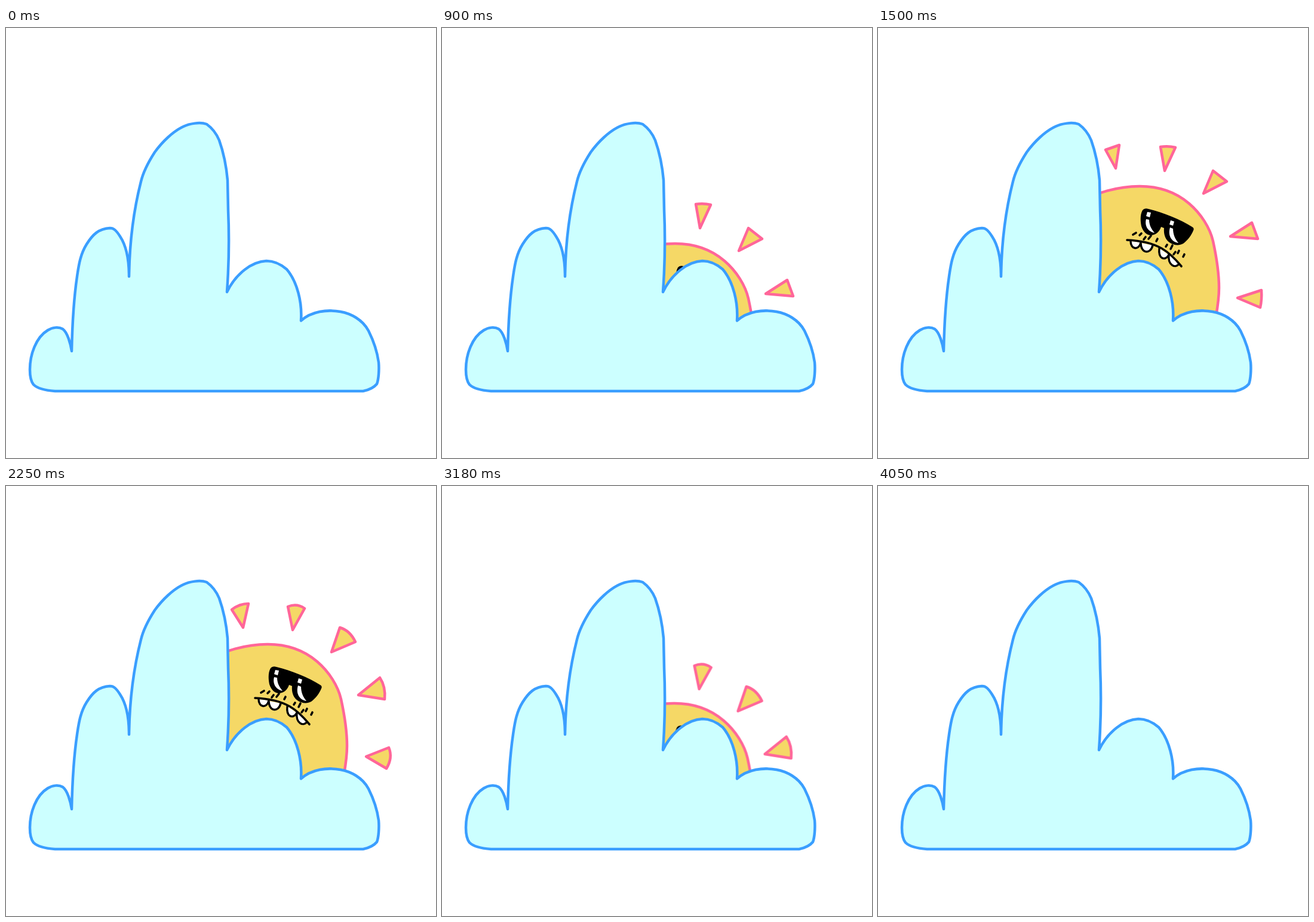
These frames come from a looping animation (720 px wide and 720 px high, 4.5 s). An HTML page:

```html
<!DOCTYPE html>
<html lang="en">
<head>
<meta charset="utf-8">
<title>Sun behind a cloud</title>
<style>
  html, body { margin: 0; width: 100%; height: 100%; overflow: hidden; background: #fff; }
  svg { display: block; width: 100%; height: 100%; }
  path { stroke-linecap: round; stroke-linejoin: round; }

  .sun { animation: peek 4.5s infinite; }
  .pose { animation: flip .3s step-end infinite; }
  .pose.alt { animation-delay: -.15s; }

  .warm { fill: #f5d866; stroke: #ff6699; stroke-width: 4.5; }
  .cloud { fill: #ccffff; stroke: #3a9eff; stroke-width: 4.5; }
  .ink { fill: none; stroke: #000; stroke-width: 3.6; }
  .tooth { fill: #fff; stroke: #000; stroke-width: 3.4; }
  .shine { fill: #fff; }

  /* The sun moves on a 30 ms clock: 50 steps up, 51 steps down. */
  @keyframes peek {
    0% { transform: translate(-120px, 240px); animation-timing-function: steps(50); }
    33.3333% { transform: translate(0, 0); }
    56.6667% { transform: translate(0, 0); animation-timing-function: steps(51); }
    90.6667%, 100% { transform: translate(-120px, 240px); }
  }
  @keyframes flip {
    0% { opacity: 1; }
    50%, 100% { opacity: 0; }
  }
</style>
</head>
<body>
<svg viewBox="0 0 720 720">
  <clipPath id="horizon"><path d="M0 0H720V600H0Z"/></clipPath>

  <g clip-path="url(#horizon)">
    <g class="sun">
      <path class="warm" d="M330 296C362 275 405 265 438 265C470 265 499 275 521 294
        C541 311 556 335 561 357C566 380 571 410 571 435C571 450 569 465 566 482L540 620H330Z"/>

      <g class="warm pose">
        <path d="M381 204L404 196L398 235Z"/>
        <path d="M473 199Q486 197 498 200L480 239Z"/>
        <path d="M561 239L584 257L545 277Z"/>
        <path d="M626 326L636 353L590 349Z"/>
        <path d="M642 439Q643 455 640 468L602 452Z"/>
      </g>
      <g class="warm pose alt">
        <path d="M378 207Q391 197 406 197L397 237Z"/>
        <path d="M472 202Q487 196 500 205L480 241Z"/>
        <path d="M559 237Q576 242 585 261L545 278Z"/>
        <path d="M626 321Q636 336 634 357L590 350Z"/>
        <path d="M641 438Q648 455 637 473L603 453Z"/>
      </g>

      <path d="M443 305Q446 301 453 303C478 309 507 321 526 333Q530 335 528 339
        C525 347 518 356 511 361C504 365 495 364 488 359C481 354 478 345 479 335L474 333
        C471 342 464 347 457 347C450 347 444 341 441 332C439 322 439 312 443 305Z"/>
      <g class="shine">
        <path d="M451 308L457 309L455 317L449 315Z"/>
        <path d="M449 320C446 331 452 341 463 343C457 336 454 329 454 321Z"/>
        <path d="M490 322L496 324L494 331L488 329Z"/>
        <path d="M489 334C485 347 491 358 503 360C497 353 494 345 494 336Z"/>
      </g>

      <g class="tooth">
        <path d="M423 357C423 371 437 373 440 359"/>
        <path d="M440 360C440 377 456 380 460 364"/>
        <path d="M471 369C469 386 480 391 487 380"/>
        <path d="M487 379C485 398 498 403 504 395"/>
      </g>
      <path class="ink" d="M417 355C440 356 459 360 475 369C489 377 499 388 508 399"/>
      <path class="ink" d="M427 346L432 343M438 347L441 344M445 354L448 350M453 353L457 348
        M466 357L468 353M482 366L484 363M490 370L493 364M495 379L498 375
        M502 377L504 373M511 383L513 379"/>
    </g>
  </g>

  <path class="cloud" d="M110 541C108 528 103 510 95 504C88 500 78 501 70 506
    C50 518 40 547 40 572C40 584 42 592 46 597C53 604 68 607 82 608H598
    C608 606 616 602 621 596C624 588 625 572 624 560C622 545 617 527 607 507
    C597 488 577 478 560 475C538 471 512 474 494 490C496 460 488 425 470 404
    C456 392 444 390 436 390C412 391 385 411 370 442C373 400 374 350 372 305
    L371 255C369 232 363 205 357 188C352 176 343 166 336 161C325 157 307 160 297 165
    C280 173 262 190 249 208C240 222 230 240 226 257C215 300 207 350 206 416
    C206 395 203 367 191 349C184 338 180 335 174 335C155 336 145 346 135 362
    C125 378 122 395 119 416C114 450 111 495 110 541Z"/>
</svg>
</body>
</html>
```
